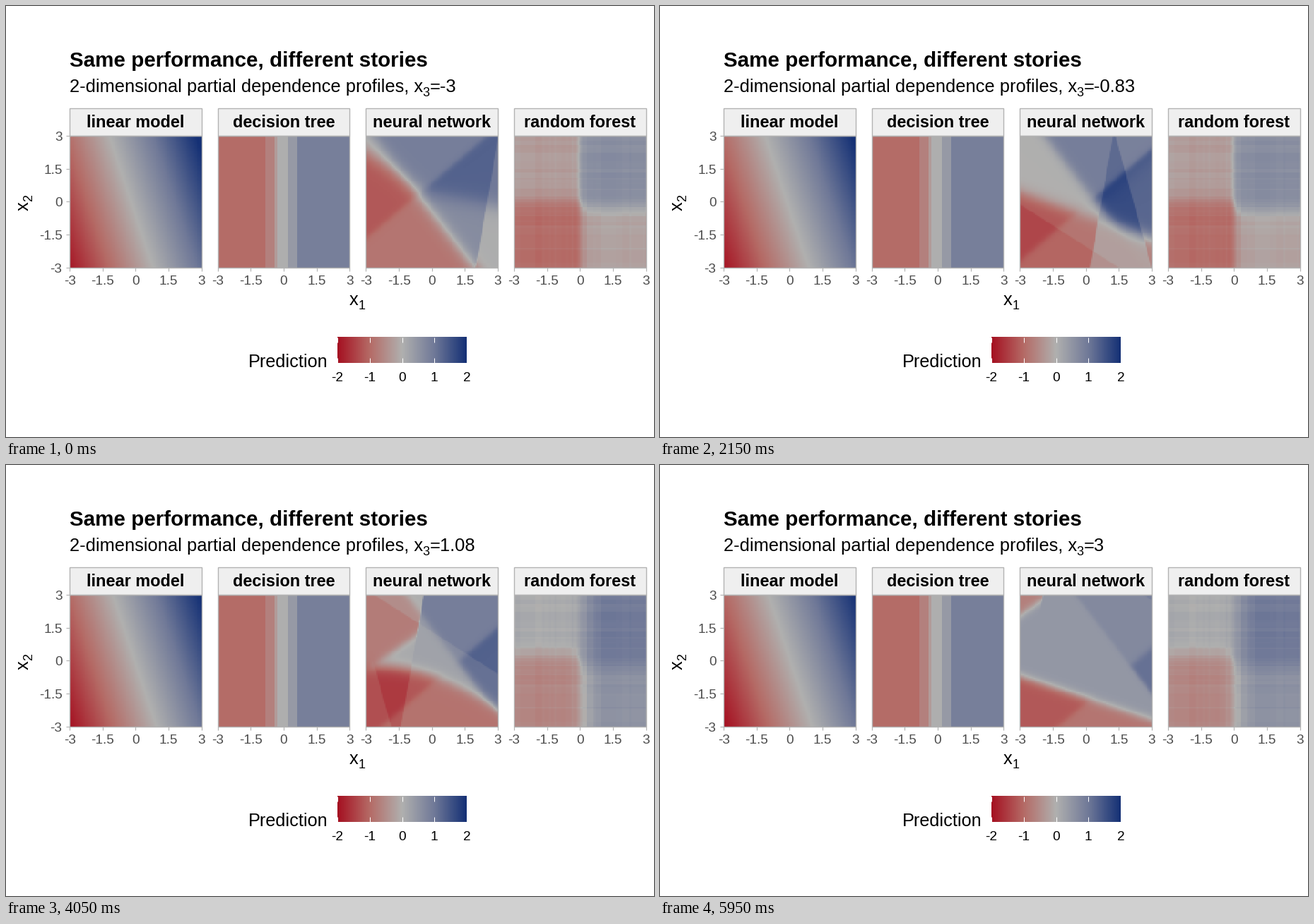
A matplotlib script that plays this animation: 917x611 px, repeating every 6 s.

```python
import numpy as np
import matplotlib.pyplot as plt
from matplotlib.animation import FuncAnimation
from matplotlib.colors import LinearSegmentedColormap
from matplotlib.patches import Rectangle

W, H, DPI = 917, 611, 64
PT = 72 / DPI
FRAMES, STEP_MS = 120, 50
TOP, SIDE, GAP = 184.2, 186.5, 209.6
LEFTS = [90.2 + GAP * i for i in range(4)]
NAMES = ["linear model", "decision tree", "neural network", "random forest"]
GREY, TICK_TEXT = "#b3b3b3", "#4d4d4d"

plt.rcParams["font.family"] = "Liberation Sans"
CMAP = LinearSegmentedColormap.from_list(
    "prediction", ["#a51021", "#b56b66", "#b0b0af", "#707998", "#143075"], N=512)

N = 100
AXIS = np.linspace(-3, 3, N)
X, Y = np.meshgrid(AXIS, AXIS)


def step(d, soft):
    """Logistic step from 0 to 1 across d = 0."""
    return 0.5 * (1 + np.tanh(d / (2 * soft)))


def ramp(t, a, b):
    u = np.clip((t - a) / (b - a), 0, 1)
    return u * u * (3 - 2 * u)


def bump(t, centre, width):
    return np.exp(-((t - centre) / width) ** 2)


def mix(a, b, u):
    return a + (b - a) * u


def linear_model(x3):
    return 0.5 * X + 0.165 * Y + 0.04 - 0.02 * x3


def decision_tree(x3):
    leaves = np.array([-0.97, -0.68, -0.3, 0.03, 0.4, 0.88])
    return leaves[np.searchsorted([-0.83, -0.4, -0.28, 0.2, 0.62], X)]


def boundary(x3, fold):
    """Height of the red/blue border: a kinked line, then the fold, then an arch."""
    early = 0.3 - 0.07 * (x3 + 3) - np.where(X < 0, 0.2 + 0.18 * min(x3 + 1.4, 0) ** 2, 0.17) * X
    late = -0.12 - 0.53 * x3 - 0.33 * X - 0.15 * bump(x3, 0.43, 0.7) * X ** 2
    return mix(mix(early, fold, ramp(x3, -1.2, -0.3)), late, ramp(x3, -0.25, 0.4))


def neural_network(x3):
    # Hidden units: straight edges that drift with x3
    fold = -0.64 * X - 0.58 + 1.77 * x3
    under = step(fold - Y, 0.015)
    one = step(X - 0.02 + 0.84 * x3 - 0.173 * Y, 0.012)
    two = step(X - 0.07 + 2.55 * x3 + 0.275 * Y, 0.012)
    right = step(X + Y / 1.3 - 0.75 - 0.37 * x3, 0.14 - 0.025 * x3)
    depth = 0.85 * X - 0.55 - 0.47 * x3 - Y
    ridge = 0.6 * bump(x3, -0.8, 1.5) * np.exp(-np.maximum(depth, 0) / 0.5)
    diag = step(depth, 0.1)
    crest = step(Y + 0.52 + 0.36 * x3 - 0.41 * x3 ** 2 - 0.7 * (X + 3), 0.12)
    high = step(Y - boundary(x3, fold), 0.18 - 0.14 * bump(x3, -0.28, 0.4) - 0.02 * x3)

    # How strongly each edge acts at this x3
    flip = 2 * ramp(x3, -3, -1.4) - 1
    fading = 1 - ramp(x3, 0.5, 1.7)
    drop = 0.8 * bump(x3, 0.43, 0.6) * (1 - 0.5 * one)

    low = mix(-1.2, 0.3 - 1.5 * ramp(x3, -3, -0.6), right) + 0.35 * diag
    low += fading * (0.6 * flip * one - 0.45 * two - 0.2 * under)
    top = mix(0.45 * ramp(x3, -0.3, 1.6), 0.9 + 0.45 * diag * (0.9 + ridge), right)
    top += 0.3 * flip * (1 - ramp(x3, -0.3, 0.4)) * one
    top -= 0.35 * (1 - ramp(x3, -0.3, 0.3)) * two
    top -= under * mix(drop, 0.2, right)
    top -= 1.15 * ramp(x3, 0, 1.6) * crest * (1 - one)
    return mix(low, top, high)


rng = np.random.default_rng(7)


def bands(count):
    """Cut the axis at random places: a stepped coordinate and a level per band."""
    cuts = np.sort(np.concatenate([rng.uniform(-3, 3, count), rng.normal(0, 0.7, count)]))
    band = np.searchsorted(cuts, AXIS)
    mid = np.array([AXIS[band == b].mean() for b in band])
    return mid, rng.normal(0, 0.035, 2 * count + 1)[band]


XB, X_NOISE = bands(24)
YB, Y_NOISE = bands(28)
XQ, YQ = np.meshgrid(XB, YB)
GRAIN = X_NOISE[None, :] + Y_NOISE[:, None]


def random_forest(x3):
    late = ramp(x3, -1, 1.2)
    soft = 0.1 + 0.13 * late
    shift = 0.4 * bump(x3, 0.43, 0.5)
    edge = mix(0.1 + 0.25 * late, -0.3 - 0.5 * bump(x3, -0.3, 0.5), step(XQ, 0.1))
    top = mix(-0.3 + 0.38 * late, 0.6 + 0.35 * late, step(XQ - 0.25 * late, soft))
    low = mix(-0.95 + 0.35 * late, -0.2 + 0.75 * late, step(XQ - 0.1 - shift, soft))
    return mix(low, top, step(YQ - edge, 0.2)) + GRAIN


MODELS = [linear_model, decision_tree, neural_network, random_forest]

fig = plt.figure(figsize=(W / DPI, H / DPI), dpi=DPI, facecolor="white")
ax = fig.add_axes([0, 0, 1, 1])
ax.axis("off")


def label(x, y, s, px, **kw):
    return ax.text(x, y, s, fontsize=px * PT, va="baseline", rotation_mode="anchor", **kw)


def stroke(xs, ys, color=GREY, px=1.2):
    ax.plot(xs, ys, color=color, lw=px * PT, solid_capstyle="butt", zorder=4)


def box(x, y, w, h, fill="none"):
    ax.add_patch(Rectangle((x, y), w, h, fc=fill, ec=GREY, lw=1.4 * PT, zorder=3))


def raster(data, left, right, top, bottom):
    return ax.imshow(data, cmap=CMAP, vmin=-2, vmax=2, origin="lower", aspect="auto",
                     extent=(left, right, bottom, top), interpolation="nearest")


def axis_name(x, y, index, dx, dy, **kw):
    label(x, y, "x", 25.5, **kw)
    label(x + dx, y + dy, index, 17.9, **kw)


images = []
for left, name in zip(LEFTS, NAMES):
    images.append(raster(np.zeros((N, N)), left, left + SIDE, TOP, TOP + SIDE))
    box(left, 145, SIDE, TOP - 145, "#efefef")
    box(left, TOP, SIDE, SIDE)
    label(left + SIDE / 2, 172.5, name, 23.5, weight="bold", ha="center", zorder=5)
    for k in range(5):
        tick = f"{1.5 * (k - 2):g}"
        x, y = left + SIDE * k / 4, TOP + SIDE * (1 - k / 4)
        stroke([x, x], [TOP + SIDE, TOP + SIDE + 5.5])
        label(x, 395, tick, 19, color=TICK_TEXT, ha="center")
        if left == LEFTS[0]:
            stroke([left - 5.5, left], [y, y])
            label(79.5, y + 7, tick, 19, color=TICK_TEXT, ha="right")

label(90, 86, "Same performance, different stories", 29.6, weight="bold")
label(90, 122, "2-dimensional partial dependence profiles, x", 25.5)
label(589.3, 128, "3", 17.9)
value = label(599.4, 122, "", 25.5)
axis_name(485.5, 424, "1", 13, 6)
axis_name(31.5, 290, "2", 6, -13, rotation=90)

# Colour bar
label(343, 512, "Prediction", 25.2)
B0, B1, BT, BB = 469, 652, 469.5, 506
raster(np.linspace(-2, 2, 300)[None, :], B0, B1, BT, BB)
for k in range(5):
    x = B0 + (B1 - B0) * k / 4
    stroke([x, x], [BT, BT + 7], "white", 1)
    stroke([x, x], [BB - 7, BB], "white", 1)
    label(x, 532, str(k - 2), 19, ha="center")

ax.set_xlim(0, W)
ax.set_ylim(H, 0)


def draw(i):
    x3 = -3 + 6 * i / (FRAMES - 1)
    value.set_text(f"={round(x3, 2):g}")
    for image, model in zip(images, MODELS):
        image.set_data(model(x3))
    return [value, *images]


anim = FuncAnimation(fig, draw, frames=FRAMES, interval=STEP_MS, repeat=True,
                     repeat_delay=0, blit=False)
plt.show()
```
